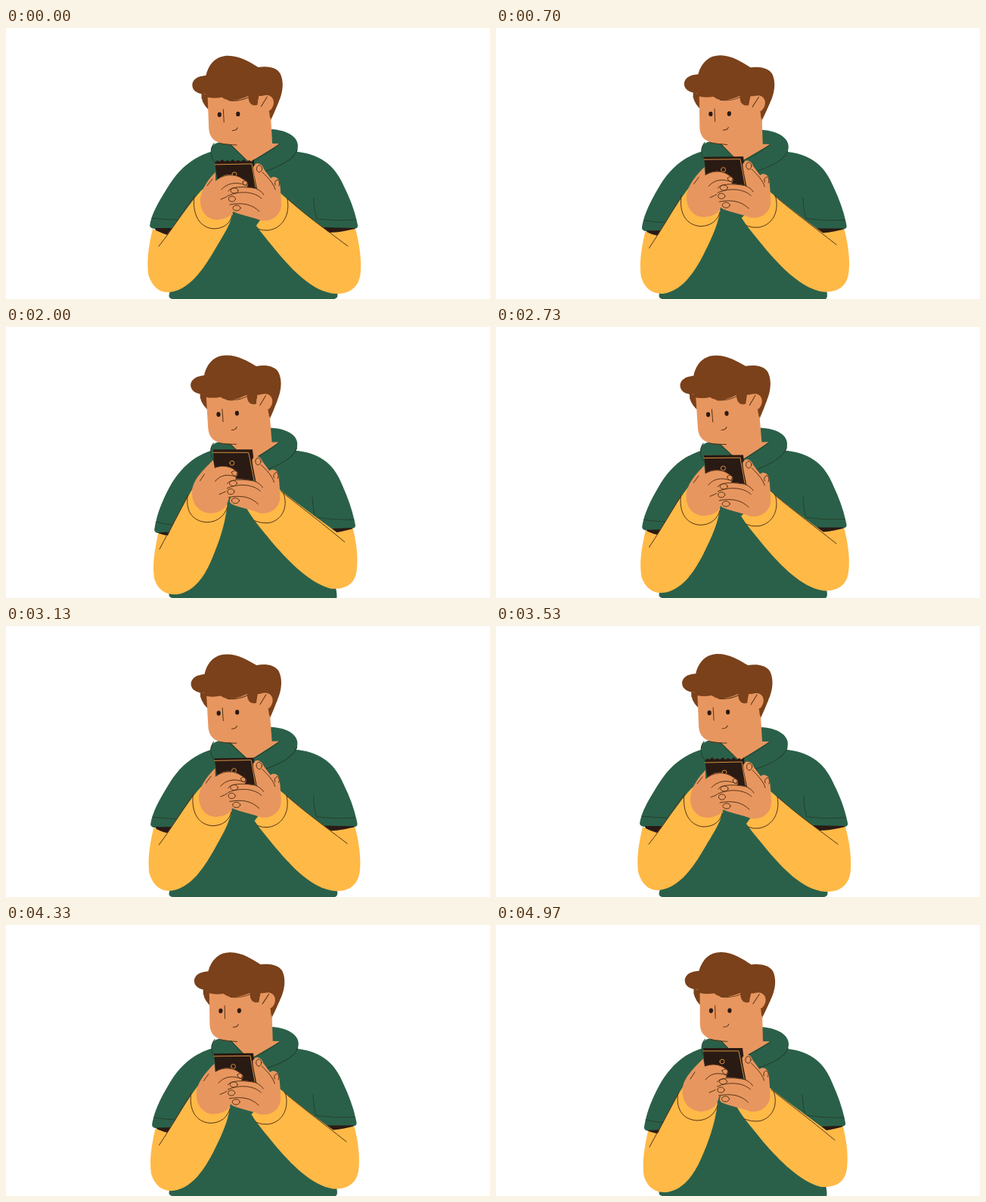
These frames come from a looping animation (640x359 px, 5 s). An HTML page:

```html
<!DOCTYPE html>
<html lang="en">
<head>
<meta charset="utf-8">
<title>Man with a phone</title>
<style>
  html, body { margin: 0; width: 100%; height: 100%; overflow: hidden; background: #fff; }
  svg { display: block; width: 100%; height: 100%; }
  .green { fill: #2a6049; }
  .yellow { fill: #ffb947; }
  .skin { fill: #e8965f; }
  .hair { fill: #7a411a; }
  .dark { fill: #2a1a14; }
  .line { fill: none; stroke: #553419; stroke-width: 1; stroke-linecap: round; stroke-linejoin: round; }
  .seam { stroke: #27402c; }
  .gold { stroke: #d3923f; }
</style>
</head>
<body>
<!-- d is the lowered pose, data-to the raised one -->
<svg viewBox="0 0 640 359">
  <path class="green"
    d="M283 161C252 167 232 183 217 206C203 228 192 246 190 262Q191 266 198 266L232 266L216 352Q214 358 220 359L434 359Q440 358 438 350L420 265L460 266Q466 266 465 261C462 245 456 228 447 210C436 184 418 168 386 164Z"
    data-to="M283 161C254 166 234 183 219 207C207 228 199 248 196 267Q195 272 202 273L232 272L216 352Q214 358 220 359L437 359Q438 358 437 350L420 268L456 267Q463 267 462 262C459 245 453 228 445 210C435 184 418 168 386 164Z"/>
  <path class="line seam" d="M193 252Q210 254 229 254" data-to="M198 258Q210 261 224 262"/>
  <path class="line seam" d="M407 225C407 237 409 246 411 253Q436 256 461 254" data-to="M405 225C406 237 407 246 409 252Q436 256 460 255"/>

  <g id="hood">
    <path class="green" d="M296 151C284 149 271 153 271 162Q270 172 279 179L320 192L340 192C362 185 382 174 385 162C390 146 374 135 349 134Z"/>
    <path class="line seam" d="M277 178C270 172 269 161 275 153M339 191C361 184 381 174 385 161"/>
  </g>
  <g id="head">
    <path class="hair" d="M258 87Q257 98 267 108L272 90ZM340 90L360 98Q355 111 349 124Z"/>
    <path class="skin" d="M266 86L268 133C269 147 277 154 297 154L319 176Q322 179 327 175L362 153L352 153L349 104L340 84Z"/>
    <path class="hair" d="M258 94C259 90 263 89 264 88C250 88 245 81 246 74C248 66 256 64 264 63C268 46 279 37 293 37C309 37 321 45 333 52C345 50 357 52 362 60C368 72 365 87 360 98Q355 110 349 120L345 90L334 90L332 102C324 104 320 99 320 90C311 94 302 97 294 96Q289 95 285 92Q275 94 266 92Z"/>
    <path class="skin" d="M333 102C331 92 338 88 346 89C355 91 356 102 349 109Q341 110 333 102Z"/>
    <path class="line" d="M294 96Q306 98 320 92M337 104L345 91M287 108L288 125M299 136Q305 136 306 132M283 153Q292 155 305 155"/>
    <path class="line seam" d="M297 155L320 177M362 153Q350 163 328 175"/>
    <ellipse class="dark" cx="282" cy="115" rx="2.6" ry="3.2"/>
    <ellipse class="dark" cx="306.5" cy="114" rx="2.6" ry="3.2"/>
  </g>

  <path class="dark" d="M197 265L222 265L213 276L198 270Z" data-to="M201 272L222 271L213 278L203 275Z"/>
  <path class="dark" d="M418 264L461 265L461 269L428 273Z" data-to="M424 267L458 266L458 270L437 273Z"/>
  <path class="yellow"
    d="M194 266C188 290 186 310 188 326C193 343 203 351 216 350C243 347 262 318 277 292C287 275 296 262 300 246L262 212C250 222 235 246 213 274C206 272 200 269 194 266Z"
    data-to="M201 273C195 300 193 318 196 334C201 349 212 355 226 354C249 350 262 330 271 310C282 285 290 262 293 236L253 205C242 222 232 240 214 276C209 276 205 274 201 273Z"/>
  <path class="yellow"
    d="M462 266C468 288 470 308 469 322C468 343 455 353 435 352C405 349 380 322 358 296C345 280 338 272 331 262L362 218C385 238 405 255 428 271C440 271 452 268 462 266Z"
    data-to="M459 267C464 288 466 305 464 322C462 342 448 348 430 347C402 340 375 312 354 288C338 268 326 255 318 240L360 214C385 234 410 252 437 272C445 271 452 269 459 267Z"/>
  <path class="line" d="M249 223C236 239 224 262 202 289" data-to="M241 223C230 245 218 266 203 294"/>
  <path class="line" d="M372 226C394 246 416 262 452 289" data-to="M364 218C390 239 412 255 448 285"/>
  <path class="line" d="M249 222C246 246 255 264 274 266C289 266 297 258 299 248" data-to="M241 222C237 242 246 258 266 259C280 259 290 250 293 239"/>
  <path class="line" d="M372 226C376 246 367 265 347 268Q340 269 333 266" data-to="M367 220C374 239 365 257 347 260Q338 261 328 257"/>

  <path class="dark" id="fringe" d="M277 179L279 175L282 177L286 174L289 177L293 175L296 177L300 174L303 177L307 175L311 177L314 174L318 177L322 175L324 177L328 174L328 179Z"/>
  <path class="dark" d="M276 178L328 177L332 212L300 212L280 204Z" data-to="M274 163L326 163L331 203L300 205L276 192Z"/>
  <path class="line gold" d="M276 181L325 180L330 211" data-to="M274 167L321 167L328 203"/>
  <path class="line gold" d="M299 194A3 3 0 0 1 305 194A3 3 0 0 1 299 194Z" data-to="M296 181A3 3 0 0 1 302 181A3 3 0 0 1 296 181Z"/>

  <path class="skin"
    d="M277 191C268 200 259 212 257 226C256 243 266 254 280 254C292 253 300 248 302 240L318 211C322 207 320 203 313 200C306 195 297 193 289 195C284 197 280 200 277 203Z"
    data-to="M274 177C264 187 250 200 247 214C244 232 254 246 270 247C282 247 290 242 293 234L305 199C309 195 307 192 303 190C297 185 287 184 281 186C278 187 277 187 276 187Z"/>
  <path class="line" d="M279 201C291 192 305 194 313 200C319 203 321 206 318 209" data-to="M276 187C286 183 297 185 303 190C308 193 308 196 305 199"/>
  <path class="line" d="M285 214C292 206 304 203 316 208" data-to="M277 205C284 196 294 195 305 199"/>
  <path class="line" d="M313 204Q317 200 320 205L317 209Q313 208 313 204" data-to="M299 193Q303 189 307 193L305 198Q300 198 299 193"/>
  <path class="line" d="M284 227Q290 225 296 221" data-to="M282 222Q287 220 293 217"/>
  <path class="line" d="M266 209L273 200" data-to="M257 204L263 195"/>

  <g id="hand">
    <path class="skin" d="M330 180C334 178 339 181 341 187L350 199C354 195 361 198 362 205C363 214 364 225 364 236C362 250 350 257 337 255C325 250 312 248 302 244C297 242 296 238 299 235C292 233 290 227 294 222C291 217 294 211 301 210C312 209 322 211 332 213C330 202 327 190 327 184Z"/>
    <path class="line" d="M294 216C298 209 318 210 332 213M294 222C310 215 329 217 338 226M296 234C312 231 325 233 335 243M331 213Q338 216 341 221M339 191C346 198 354 206 356 214"/>
    <g class="line">
      <ellipse cx="302" cy="215.5" rx="5" ry="3.6"/>
      <ellipse cx="299" cy="226.5" rx="4.5" ry="3.6"/>
      <ellipse cx="305" cy="238.5" rx="5" ry="3.6"/>
      <ellipse cx="335" cy="186.5" rx="3.6" ry="4.6"/>
      <path d="M356 208Q354 203 359 201Q363 203 361 209"/>
    </g>
  </g>
</svg>
<script>
const LOOP = 5000, CYCLE = 3600;
const LOWEST = 3540;                       // arms at their lowest
const TILT_RIGHT = 1350, TILT_LEFT = 2250; // head extremes within a cycle
const NUM = /\d+(\.\d+)?/g;
const byId = id => document.getElementById(id);
const ease = x => (1 - Math.cos(Math.PI * x)) / 2;

const morphs = [...document.querySelectorAll('[data-to]')].map(el => ({
  el,
  from: el.getAttribute('d'),
  to: el.dataset.to.match(NUM).map(Number)
}));

function mix({ from, to }, p) {
  let i = 0;
  return from.replace(NUM, n => {
    const end = to[i++];
    return (+n + (end - n) * p).toFixed(2).replace(/\.00$/, '') + ' ';
  });
}

function lift(t) {
  const a = ease(2 * (t - LOWEST) / CYCLE);
  return 1.1 * a ** 0.85;
}

// Quick swing to the left, slow return to the right.
function tilt(t) {
  const fall = TILT_LEFT - TILT_RIGHT;
  const u = (t - TILT_RIGHT + CYCLE) % CYCLE;
  const right = u < fall ? 1 - ease(u / fall) : ease((u - fall) / (CYCLE - fall));
  return -1.6 + 3.7 * right;
}

function draw(now) {
  const t = now % LOOP, p = lift(t), angle = tilt(t);
  for (const m of morphs) m.el.setAttribute('d', mix(m, p));
  byId('hand').setAttribute('transform', `translate(${-1.5 * p} ${-8 * p})`);
  byId('head').setAttribute('transform', `rotate(${angle} 325 180)`);
  byId('hood').setAttribute('transform', `rotate(${angle} 325 190)`);
  byId('fringe').style.visibility = p < 0.08 ? 'visible' : 'hidden';
}

let start;
function tick(now) {
  start ??= now;
  draw(now - start);
  requestAnimationFrame(tick);
}
draw(0);
requestAnimationFrame(tick);
</script>
</body>
</html>
```
